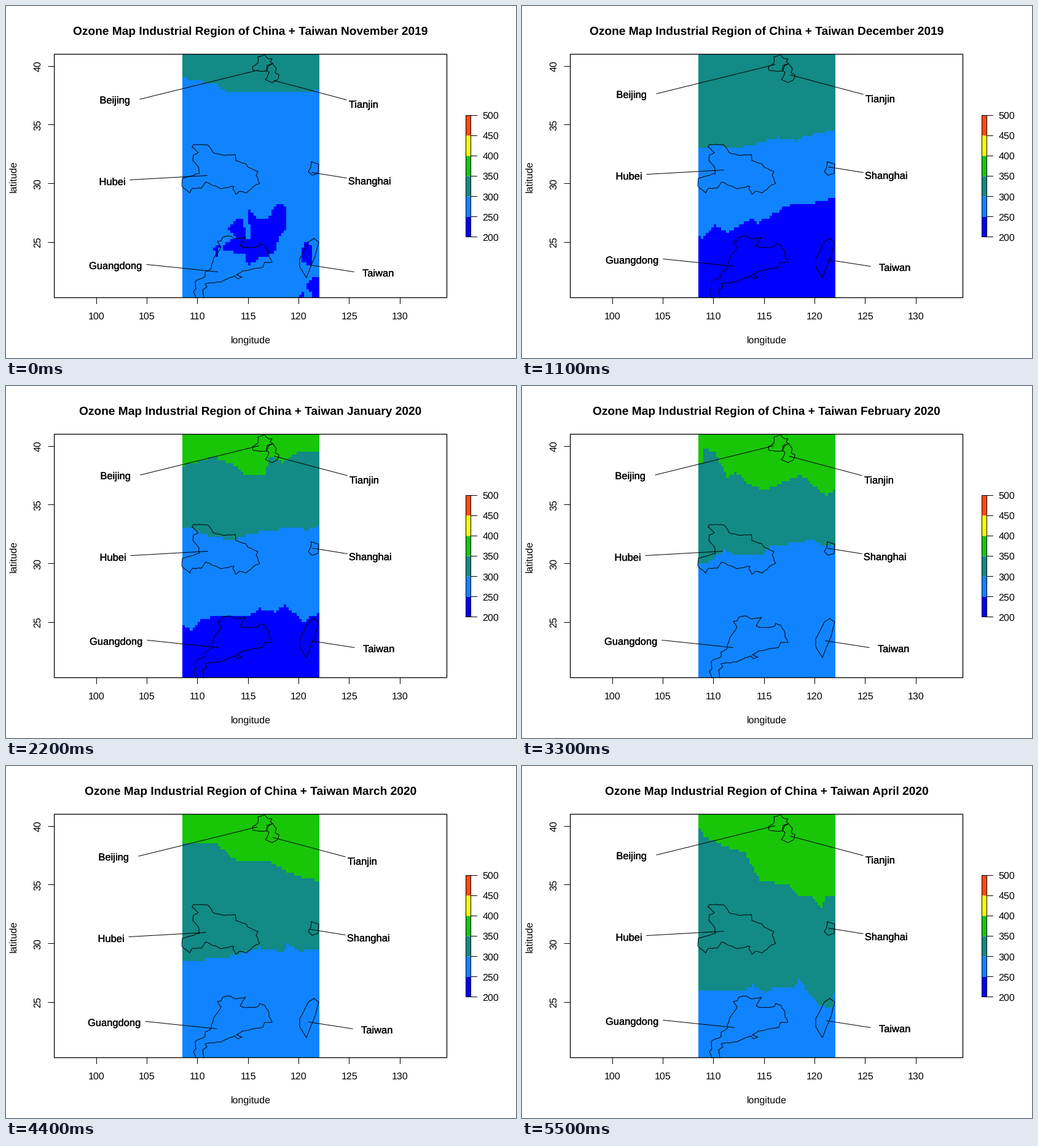
Recreate the animation shown at these times as a matplotlib script. Size 830 by 574 pixels, loop 6.6 s.

```python
import numpy as np
import matplotlib.pyplot as plt
from matplotlib.animation import FuncAnimation
from matplotlib.colors import ListedColormap
from matplotlib.patches import Rectangle
from matplotlib.patheffects import Stroke, Normal
from matplotlib.path import Path

W, H, DPI = 830, 574, 100
PX = 72 / DPI
COLS, ROWS = 54, 83
PALETTE = ["#0000ff", "#1084ff", "#128a85", "#18c607", "#ffff00", "#fd4d0d"]

plt.rcParams.update({"font.family": "Liberation Sans", "path.snap": False,
                     "text.hinting": "none"})


def lon_x(lon):
    return 147.2 + (lon - 100) * 16.47


def lat_y(lat):
    return 98 + (40 - lat) * 19.16


# Polygons of low ozone, in (column, row) of the quarter-degree grid.
PATCHES = [
    [(26, 53), (30, 56), (34, 56), (37, 51), (39, 51), (41, 53), (41, 59), (38, 62),
     (36, 68), (31, 69), (26, 72), (24, 66), (27, 63)],
    [(21, 56), (24, 56), (25, 63), (28, 65), (25, 68), (16, 67), (17, 64), (22, 63), (18, 60)],
    [(12, 66), (15, 65), (13.6, 69)],
    [(48.3, 64), (51, 65), (51, 72), (47, 71), (47, 68)],
    [(52.5, 75.5), (54, 77), (54, 83), (51.5, 83), (49, 79)],
    [(46, 83), (48, 80.5), (48, 83)],
]

# Month, top colour level, band edges as key points (column, row), patches, label shift.
MONTHS = [
    ("November 2019", 2,
     [[(0, 8), (2, 9), (13, 10), (17, 13), (51, 13), (53, 12)]], PATCHES, (0, 0)),
    ("December 2019", 2,
     [[(0, 32), (7, 31), (14, 32.4), (31, 28.4), (38, 29.6), (41, 28), (53, 26)],
      [(0, 62), (1, 63), (6, 58.4), (11, 61), (20, 56), (23, 57.5), (36, 51), (45, 50.6),
       (53, 49)]], [], (1, -9)),
    ("January 2020", 3,
     [[(0, 10.6), (12, 8), (20, 10.6), (24, 14), (32, 14), (34, 7.6), (39, 9.6), (45, 6.4),
       (53, 6)],
      [(0, 31.6), (10, 34.6), (19, 36), (31, 33), (46, 31.8), (49, 33), (53, 31)],
      [(0, 65), (3, 67), (7, 62.6), (26, 62), (30, 59.4), (36, 60.6), (40, 58), (47, 64),
       (53, 61)]], [], (1, -7)),
    ("February 2020", 3,
     [[(0, 10), (1, 10), (2, 5), (6, 6), (11, 15), (14, 13), (21, 18), (26, 19), (40, 14),
       (50, 21), (53, 19)],
      [(0, 44), (3, 44), (10, 39.4), (14, 41.4), (25, 40.6), (28, 38.4), (45, 36), (48, 38),
       (53, 38)]], [], (-1, -7)),
    ("March 2020", 3,
     [[(0, 10.4), (13, 10.4), (21, 16), (34, 16), (41, 20), (53, 23)],
      [(0, 50), (17, 49), (30, 45.4), (39, 47), (41, 44), (46, 46.6), (53, 46)]], [], (-2, -5)),
    ("April 2020", 3,
     [[(0, 5), (2, 8), (12, 11.6), (18, 13.4), (24, 23), (35, 24), (39, 28), (45, 28.6),
       (48, 32), (50, 28), (53, 28)],
      [(0, 60), (16, 60.4), (21, 58.4), (26, 61), (30, 58.6), (37, 59), (39, 56), (42, 59.6),
       (47, 65), (52, 66), (53, 61)]], [], (1, -7)),
]

HUBEI = [(303, 230), (305, 226), (329, 227), (337, 239), (351, 243), (373, 242), (374, 252),
         (390, 257), (394, 263), (410, 270), (407, 276), (413, 289), (406, 292), (391, 305),
         (380, 302), (374, 307), (369, 298), (371, 294), (350, 298), (325, 287), (318, 297),
         (304, 297), (299, 305), (286, 293), (287, 281), (315, 273), (314, 264), (304, 252),
         (305, 243), (313, 239), (303, 230)]
GUANGDONG = [(309, 476), (305, 466), (309, 461), (308, 449), (324, 441), (324, 434),
             (334, 428), (338, 411), (350, 393), (344, 384), (350, 383), (353, 377), (365, 375),
             (374, 380), (390, 377), (381, 391), (391, 394), (411, 392), (413, 387), (421, 390),
             (428, 402), (428, 409), (433, 418), (421, 418), (418, 426), (385, 432), (375, 438),
             (384, 442), (377, 445), (372, 440), (349, 450), (324, 453), (327, 458), (320, 463),
             (322, 476)]
BEIJING = [(421, 79), (410, 83), (410, 93), (401, 99), (402, 105), (424, 106), (425, 97),
           (434, 94), (430, 91), (433, 86), (427, 86), (421, 79)]
TIANJIN = [(434, 94), (427, 98), (424, 105), (428, 108), (422, 120), (433, 125), (441, 121),
           (444, 112), (438, 109), (440, 102), (434, 94)]
SHANGHAI = [(497, 254), (509, 258), (508, 273), (498, 276), (492, 270), (496, 263), (497, 254)]
TAIWAN = [(501, 379), (509, 385), (503, 408), (489, 443), (478, 425), (478, 412), (492, 385),
          (501, 379)]

# Name, text position, pointer start, pointer end.
PLACES = [
    ("Beijing", (152.4, 159), (218, 152), (410.5, 104.5)),
    ("Tianjin", (557.9, 166), (554, 153), (436, 121.5)),
    ("Hubei", (151.5, 292), (202, 283.5), (327, 276.5)),
    ("Shanghai", (556.8, 291), (554, 280.5), (498, 271.5)),
    ("Guangdong", (135, 429), (229, 421.5), (344.5, 433.5)),
    ("Taiwan", (580, 441), (566, 433.5), (495, 422.5)),
]


def band_grid(top, edges, patches):
    grid = np.full((ROWS, COLS), top)
    rows, cols = np.mgrid[:ROWS, :COLS]
    for edge in edges:
        xs, ys = zip(*edge)
        grid -= rows >= np.round(np.interp(cols, xs, ys))
    centres = np.column_stack([cols.ravel(), rows.ravel()]) + 0.5
    for patch in patches:
        grid[Path(patch).contains_points(centres).reshape(grid.shape)] = 0
    return grid


def roughen(points, rng, step=5, amount=0.9):
    """Split long sides and nudge the new points, like a surveyed border."""
    out = [points[0]]
    for a, b in zip(points, points[1:]):
        a, b = np.array(a), np.array(b)
        n = max(1, round(np.hypot(*(b - a)) / step))
        out += [a + (b - a) * k / n + rng.uniform(-amount, amount, 2) for k in range(1, n)]
        out.append(b)
    return np.array(out)


fig = plt.figure(figsize=(W / DPI, H / DPI), dpi=DPI, facecolor="white")
ax = fig.add_axes([0, 0, 1, 1])
ax.set_axis_off()


def line(xs, ys):
    return ax.plot(xs, ys, color="black", lw=PX)[0]


def text(x, y, s, size=16, ha="center", **kw):
    return ax.text(x, y, s, fontsize=size * PX, ha=ha, va="baseline",
                   rotation_mode="anchor", color="black", **kw)


def box(x0, y0, x1, y1, fill="none", edge="black", width=1.0):
    ax.add_patch(Rectangle((x0, y0), x1 - x0, y1 - y0, facecolor=fill,
                           edgecolor=edge, lw=width * PX))


GRIDS = [band_grid(*month[1:4]) for month in MONTHS]
field = ax.imshow(GRIDS[0], cmap=ListedColormap(PALETTE), vmin=-0.5, vmax=5.5,
                  extent=(287, 509, 475.7, 78.1),
                  interpolation="nearest", aspect="auto", zorder=0)
ax.set_xlim(0, W)
ax.set_ylim(H, 0)

rng = np.random.default_rng(4)
for outline in (HUBEI, GUANGDONG, BEIJING, TIANJIN):
    line(*roughen(outline, rng).T)
for outline in (SHANGHAI, TAIWAN):
    line(*roughen(outline, rng, step=9, amount=0.5).T)

box(78.6, 78.6, 717.5, 475.6, width=1.3)
for lon in range(100, 131, 5):
    x = np.floor(lon_x(lon)) + 0.5
    line([x, x], [476, 485.5])
    text(lon_x(lon), 511, str(lon))
for lat in range(25, 41, 5):
    y = np.floor(lat_y(lat)) + 0.5
    line([69, 78.5], [y, y])
    text(56, lat_y(lat), str(lat), rotation=90)
text(398.3, 550, "longitude")
text(16.8, 278, "latitude", rotation=90)

BAR_TOP, BAR_STEP = 178.3, 33.1
for i, colour in enumerate(reversed(PALETTE)):
    y = BAR_TOP + i * BAR_STEP
    box(748.5, y, 756.5, y + BAR_STEP, fill=colour, edge="none")
    text(775.4, y + 5.7, str(500 - 50 * i), ha="left")
text(775.4, BAR_TOP + 6 * BAR_STEP + 5.7, "200", ha="left")
box(748.5, BAR_TOP + 0.2, 756.5, BAR_TOP + 6 * BAR_STEP - 0.4)
for i in range(7):
    y = np.floor(BAR_TOP + i * BAR_STEP) + 0.5
    line([756.5, 766.5], [y, y])

title = text(398, 46.7, "", size=19.2, weight="bold")
heavy = [Stroke(linewidth=0.3 * PX, foreground="black"), Normal()]
labels = [text(*pos, name, size=16.5, ha="left", path_effects=heavy)
          for name, pos, _, _ in PLACES]
pointers = [line([], []) for _ in PLACES]


def draw(i):
    month, _, _, _, (dx, dy) = MONTHS[i]
    field.set_data(GRIDS[i])
    title.set_text("Ozone Map Industrial Region of China + Taiwan " + month)
    for (_, pos, a, b), label, pointer in zip(PLACES, labels, pointers):
        label.set_position((pos[0] + dx, pos[1] + dy))
        pointer.set_data([a[0] + dx, b[0] + dx], [a[1] + dy, b[1] + dy])
    return [field, title, *labels, *pointers]


anim = FuncAnimation(fig, draw, frames=len(MONTHS), interval=1100, repeat=True,
                     repeat_delay=0, init_func=lambda: draw(0), blit=False)
plt.show()
```
